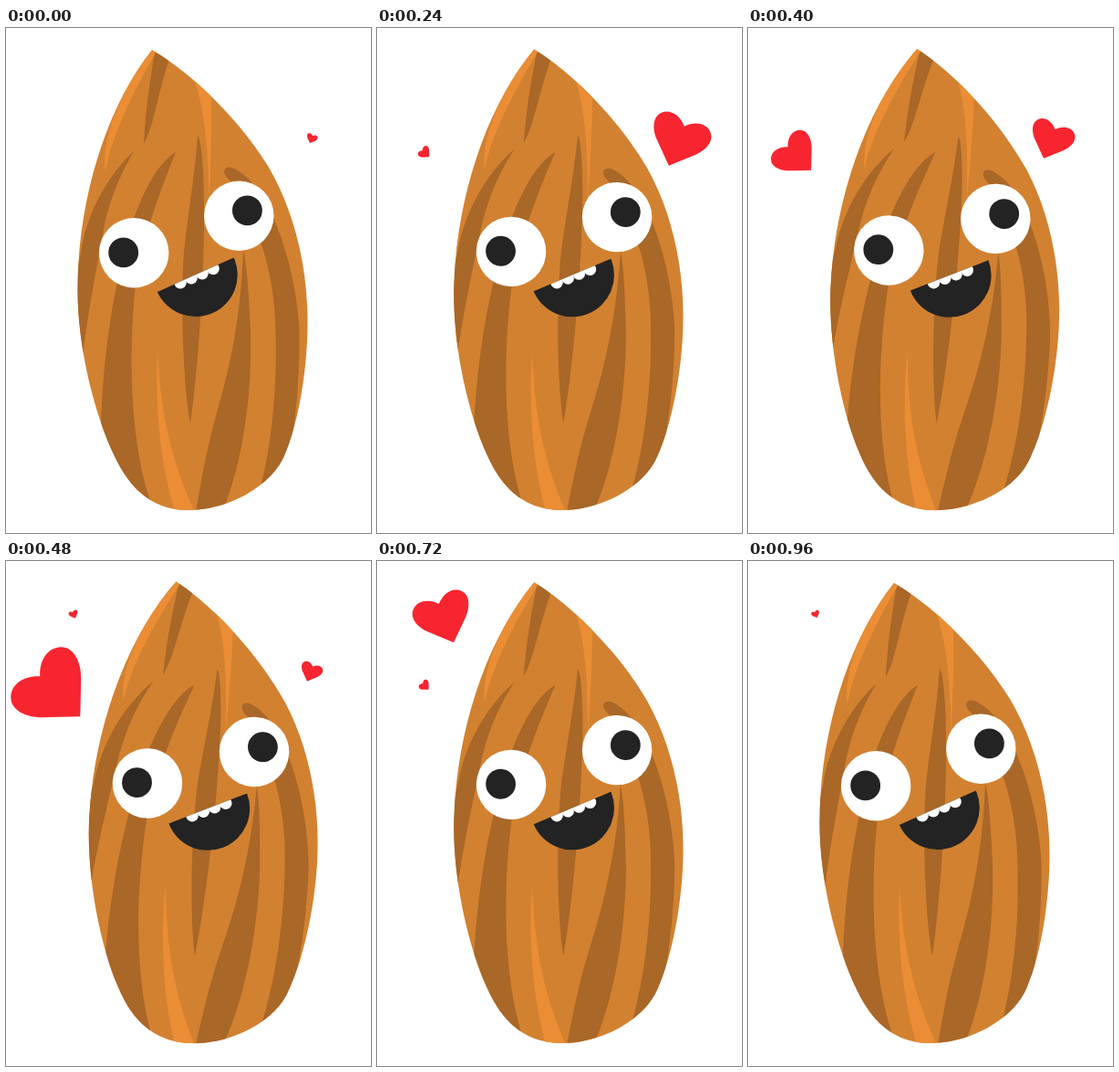
Animation, 400 px wide and 553 px high, one loop 1000 ms. Source, as an HTML page:

```html
<!DOCTYPE html>
<html lang="en">
<head>
<meta charset="utf-8">
<title>Almond in love</title>
<style>
  html, body { margin: 0; width: 100%; height: 100%; overflow: hidden; background: #fff; }
  svg { display: block; width: 100%; height: 100%; }
</style>
</head>
<body>
<svg viewBox="0 0 400 553">
  <defs>
    <path id="shell" d="M160,24 C206,51 256,101 287,151 C316,200 331,262 330.5,325 C330,375 321,430 306,466 C293,500 245,528 200,528 C168,528 140,513 119.5,470 C97,424 78.5,350 78.5,287 C78.5,190 109,88 160,24Z"/>
    <path id="grin" d="M166.5,289.6 A45.6,45.6 0 0 0 250.3,252Z"/>
    <path id="heart" d="M0,0 L30.4,-29 C43.1,-41.7 48.8,-58.7 38.9,-68.6 C29,-78.5 12,-75.7 0,-62.2 C-12,-75.7 -29,-78.5 -38.9,-68.6 C-48.8,-58.7 -43.1,-41.7 -30.4,-29Z"/>
    <clipPath id="inShell"><use href="#shell"/></clipPath>
    <clipPath id="inGrin"><use href="#grin"/></clipPath>
  </defs>
  <g id="almond">
    <use href="#shell" fill="#d28130"/>
    <g clip-path="url(#inShell)">
      <g fill="#a96728">
        <path d="M163,26 L179,34 C166,72 162,108 151,127 C153,95 155,75 163,26Z"/>
        <path d="M141,134 C110,162 88,205 82,246 L70,300 L84,360 C90,310 98,270 108,215 C116,180 128,155 141,134Z"/>
        <path d="M186,136 C165,148 148,185 138,215 C120,275 106,350 104,440 L118,524 L159,521 C138,460 133,370 141.5,285 C148,235 168,180 186,136Z"/>
        <path d="M210,118 C213,118 217,150 217,190 C218,270 210,380 202,433 C194,390 191,300 195,245 C200,200 207,160 210,118Z"/>
        <path d="M260,243 C257,330 240,390 230,425 C220,460 214,495 208,530 L237,530 C262,470 270,390 268,330 C266,295 265,265 260,243Z"/>
        <path d="M239,157 C240,151 247,152 252,155 C288,174 317,255 321.5,330 C322,380 319,410 314,450 L300,500 L279,503 C292,450 298,390 295,320 C292,260 275,215 250,172 C245,166 239,162 239,157Z"/>
      </g>
      <g fill="#ea8d34">
        <path d="M160,24 C132,60 103,115 109,158 C115,118 142,65 164,27Z"/>
        <path d="M203,48 L225,70 C226,115 224,150 223,188 C221,140 220,90 203,48Z"/>
        <path d="M166,355 C163,420 170,480 185,530 L207,530 C184,480 170,430 166,355Z"/>
      </g>
    </g>
    <g transform="translate(-0.6 -0.6)">
      <g fill="#fff">
        <circle cx="140.8" cy="246.8" r="38.2"/>
        <circle cx="255.9" cy="206.3" r="38.2"/>
      </g>
      <g fill="#232323">
        <circle cx="129.3" cy="246.5" r="16.4"/>
        <circle cx="265" cy="200.5" r="16.4"/>
        <use href="#grin"/>
      </g>
      <g clip-path="url(#inGrin)" fill="#fff">
        <circle cx="191.6" cy="279.4" r="6.8"/>
        <circle cx="203.6" cy="274.3" r="6.8"/>
        <circle cx="215.6" cy="269.2" r="6.8"/>
        <circle cx="227.6" cy="264.1" r="6.8"/>
      </g>
    </g>
  </g>
  <g id="hearts" fill="#f72530"></g>
</svg>
<script>
  const LOOP = 1000, STEP = 40, GROW = 280;
  const almond = document.getElementById('almond');
  const layer = document.getElementById('hearts');

  // x, y: point the heart grows from; dx, dy: its tip at full size
  const hearts = [
    { start: 0, x: 336, y: 120.5, dx: -21, dy: 39, tilt: 21.6, size: 0.96 },
    { start: 200, x: 52.4, y: 135.7, dx: 28.9, dy: 34.6, tilt: -45, size: 1 },
    { start: 440, x: 74.2, y: 57.6, dx: 9.8, dy: 31.6, tilt: -21, size: 0.725 }
  ];
  for (const h of hearts) {
    h.node = document.createElementNS('http://www.w3.org/2000/svg', 'use');
    h.node.setAttribute('href', '#heart');
    layer.appendChild(h.node);
  }

  const smooth = (t, from, to) => {
    const p = Math.min(1, Math.max(0, (t - from) / (to - from)));
    return p * p * (3 - 2 * p);
  };

  // Accelerating growth, then a steady shrink
  function heartScale(t) {
    if (t < 0 || t >= 2 * GROW) return 0;
    const p = t / GROW;
    return p < 1 ? (1 + 6 * p * p) / 7 : 2 - p;
  }

  function draw(t) {
    const lean = 3 * (smooth(t, 50, 450) - smooth(t, 500, 920));
    almond.setAttribute('transform', `rotate(${lean} 200 527)`);
    for (const h of hearts) {
      const s = heartScale(t - h.start);
      h.node.setAttribute('visibility', s > 0 ? 'visible' : 'hidden');
      h.node.setAttribute('transform',
        `translate(${h.x + h.dx * s} ${h.y + h.dy * s}) rotate(${h.tilt}) scale(${h.size * s})`);
    }
  }

  const origin = performance.now();
  function tick() {
    const t = (performance.now() - origin) % LOOP;
    draw(Math.floor(t / STEP) * STEP);
    requestAnimationFrame(tick);
  }
  tick();
</script>
</body>
</html>
```
